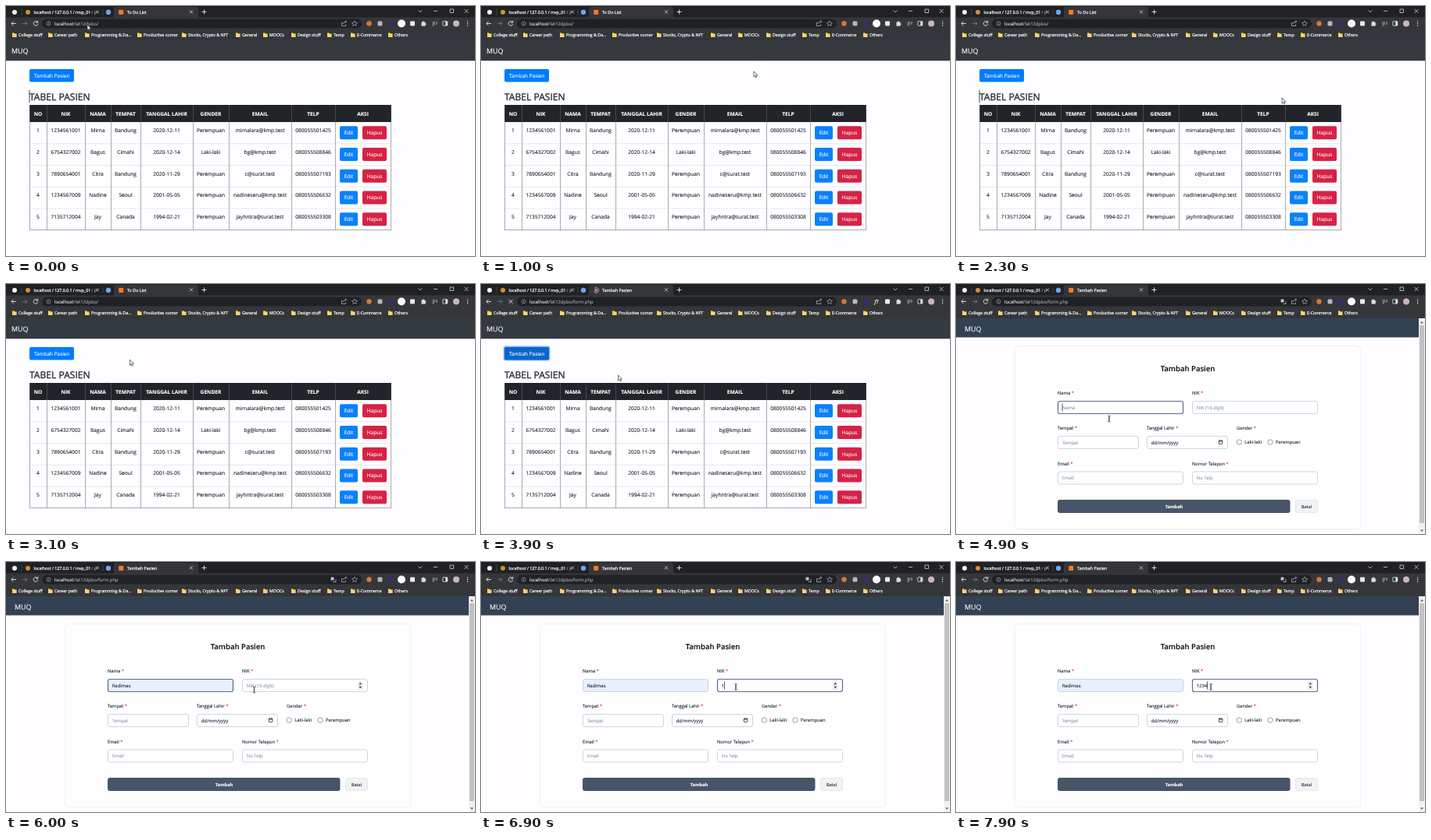
An HTML page for the animation above (8000 ms loop, 600x321 px).

```html
<!DOCTYPE html>
<html lang="id">
<head>
<meta charset="utf-8">
<title>Tambah Pasien</title>
<style>
html, body { margin: 0; width: 100%; height: 100%; overflow: hidden; background: #fff; }
svg { display: block; width: 600px; height: 321px; }
text { font-family: "Open Sans", "Noto Sans", sans-serif; text-rendering: geometricPrecision; white-space: pre; stroke-width: .12px; }
.medium { stroke-width: .28px; }
</style>
</head>
<body>
<svg id="stage" viewBox="0 0 600 321"></svg>
<script>
const LOOP = 8000, CLICK = 3500, LOAD = 3600, FORM = 4000, FOCUS = 4600, FILL = 5450, NIK = 6300;
const NAME = 'Radimas', DIGITS = '1234';

// Markup helpers
const rect = (x, y, w, h, fill, r = 0, more = '') =>
  `<rect x="${x}" y="${y}" width="${w}" height="${h}" fill="${fill}" rx="${r}" ${more}/>`;
const box = (x, y, w, h, fill, r, stroke, more = '') =>
  rect(x + .5, y + .5, w - 1, h - 1, fill, r, `stroke="${stroke}" stroke-width="1" ${more}`);
const circle = (x, y, r, fill, more = '') => `<circle cx="${x}" cy="${y}" r="${r}" fill="${fill}" ${more}/>`;
const ink = c => `fill="${c}" stroke="${c}"`;
const text = (x, y, size, color, s, more = '') => `<text x="${x}" y="${y}" font-size="${size}" ${ink(color)} ${more}>${s}</text>`;
const span = (color, s) => `<tspan ${ink(color)}>${s}</tspan>`;
const line = (d, stroke, w = 1, more = '') =>
  `<path d="${d}" fill="none" stroke="${stroke}" stroke-width="${w}" ${more}/>`;
const group = (id, body) => `<g id="${id}">${body}</g>`;
const MID = ' text-anchor="middle"', BOLD = ' font-weight="700"', MEDIUM = ' class="medium"';

function browser() {
  const pale = '#e8eaed', dim = '#a4a9af';
  const folders = [[8, 'College stuff'], [54, 'Career path'], [101, 'Programming &amp; Da...'], [168, 'Productive corner'],
    [225, 'Stocks, Crypto &amp; NFT'], [294, 'General'], [329, 'MOOCs'], [365, 'Design stuff'],
    [411, 'Temp'], [441, 'E-Commerce'], [489, 'Others']];
  return rect(0, 0, 600, 15, '#202124') + rect(0, 14.5, 600, 29.5, '#35363a') +
    `<path d="M136 15q2 0 2-2V4q0-3 3-3h102q3 0 3 3v9q0 2 2 2z" fill="#35363a"/>` +
    circle(11, 8, 3, '#f1f3f4') + line('M20 4v8M124 4v8', '#55585c', .6) +
    circle(28, 8, 3, '#d98b35') +
    text(35.6, 10, 5.25, pale, 'localhost / 127.0.0.1 / mvp_01' + span('#85888c', ' / p'), MEDIUM) +
    line('M115 5.5l4 4m0-4l-4 4M235 5.5l4 4m0-4l-4 4', '#dadce0', .8) +
    circle(131, 8, 3.2, '#6ba5ee') +
    line('M250.5 7.5h6m-3-3v6', pale, .9) +
    line('M527.5 5.5l2.5 2.5l2.5-2.5M547 6.5h5M568 4h4.5v4.5h-4.5zM586.5 4l5 5m0-5l-5 5', pale, .7) +
    group('todo', rect(144.2, 5, 6, 6, '#fb7a24', 1) + text(155, 10, 5.4, pale, 'To Do List', MEDIUM)) +
    group('tambah', text(155, 10, 5.4, pale, 'Tambah Pasien', MEDIUM)) +
    group('favicon', rect(144.2, 5, 6, 6, '#fb7a24', 1)) +
    group('loading', circle(147.2, 8, 2, '#c98a68') + line('M147.2 4.6a3.4 3.4 0 1 1-3.4 3.4', '#a9b8d4', .8, 'id="spin"')) +
    line('M13 22.5h-6m2.6-2.7l-2.7 2.7l2.7 2.7', pale, .9) +
    line('M21 22.5h6m-2.6-2.7l2.7 2.7l-2.7 2.7', '#77797d', .9) +
    group('reload', line('M40.2 20.7a2.8 2.8 0 1 0 .5 2.5M40.7 19v2.4h-2.4', pale, .9)) +
    group('stop', line('M35.8 20.2l4.6 4.6m0-4.6l-4.6 4.6', pale, .9)) +
    rect(46, 16.8, 409, 11.6, '#202124', 5.8) +
    circle(54.5, 22.5, 2.5, 'none', `stroke="${dim}" stroke-width=".7"`) + line('M54.5 22v1.8M54.5 20.9v.6', dim, .7) +
    text(62, 24.9, 5.8, pale, 'localhost' + span(dim, '/lat12dpbo/<tspan id="file">form.php</tspan>')) +
    group('translate', rect(415.5, 19.5, 4, 4, '#bdc1c6', .5) + line('M418.5 25.5h3.5v-3.5', '#bdc1c6', .8)) +
    line('M431 21.5h-1.5v4h5v-2M431.5 23q.5-3 4-3m-1.5-1.5l1.7 1.5l-1.7 1.5', '#bdc1c6', .7) +
    line('M446 19l1 2.3l2.5.2l-1.9 1.6l.6 2.4l-2.2-1.3l-2.2 1.3l.6-2.4l-1.9-1.6l2.5-.2z', '#bdc1c6', .6) +
    circle(464.5, 22.5, 3.2, '#d9772f') + rect(475.5, 19.5, 6, 6, '#b4b8be', 1.5) + rect(489.5, 19.5, 5.5, 6, '#3c2a78', 1) +
    group('disc', circle(506, 22.5, 5, '#fff')) +
    group('query', text(506, 25, 6.5, '#e8eaed', '<tspan font-style="italic">f</tspan>?', MID + MEDIUM)) +
    rect(517, 19.5, 6, 6, '#e8eaed', 1) +
    `<path d="M531.5 20.5h1.4a1 1 0 1 1 2 0h1.6v1.7a1 1 0 1 1 0 2v1.6h-5z" fill="#dadce0"/>` +
    line('M545.5 21h3.5M545.5 23h3.5M545.5 25h2M551 20v4', pale, .7) +
    rect(558.8, 19.7, 6, 5.5, 'none', .6, `stroke="${pale}" stroke-width=".8"`) + rect(562.3, 20, 2.4, 5, pale) +
    circle(576, 22.5, 4, '#c8b9b5') + [20, 22.5, 25].map(y => circle(590.5, y, .7, pale)).join('') +
    folders.map(([x, s]) => `<path d="M${x} 34.6h2.2l.8 .9h2.6v4.5h-5.6z" fill="#f8d56b"/>` +
      text(x + 8, 39, 5.3, pale, s, MEDIUM)).join('');
}

function tablePage() {
  const cols = [30, 52, 101, 134, 172, 239, 285, 365, 421, 492];
  const heads = ['NO', 'NIK', 'NAMA', 'TEMPAT', 'TANGGAL LAHIR', 'GENDER', 'EMAIL', 'TELP', 'AKSI'];
  const rows = [
    ['1234561001', 'Mirna', 'Bandung', '2020-12-11', 'Perempuan', 'mirnalara@kmp.test', '080055501425'],
    ['6754327002', 'Bagus', 'Cimahi', '2020-12-14', 'Laki-laki', 'bg@kmp.test', '080055508846'],
    ['7890654001', 'Citra', 'Bandung', '2020-11-29', 'Perempuan', 'c@surat.test', '080055507193'],
    ['1234567009', 'Nadine', 'Seoul', '2001-05-05', 'Perempuan', 'nadineseru@kmp.test', '080055506632'],
    ['7135712004', 'Jay', 'Canada', '1994-02-21', 'Perempuan', 'jayhntra@surat.test', '080055503308']];
  const center = i => (cols[i] + cols[i + 1]) / 2;
  const columns = (y, h) => cols.map(x => `M${x + .5} ${y}v${h}`).join('');
  let s = rect(0, 44, 600, 277, '#fefdff') + rect(0, 44, 600, 26.3, '#343a40') + text(7, 61, 8.9, '#fff', 'MUQ') +
    rect(28.6, 79.6, 59.8, 18.8, '#80bdff', 3, 'id="ring"') + rect(30, 81, 57, 16.5, '#007bff', 2, 'id="add"') +
    text(58.7, 91.8, 6.45, '#fff', 'Tambah Pasien', MID) +
    text(30, 121, 12.1, '#212529', 'TABEL PASIEN', MEDIUM) + rect(29.6, 108, .8, 16, '#111', 0, 'id="pageCaret"') +
    rect(30, 127, 463, 22, '#212529');
  heads.forEach((h, i) => s += text(center(i), 140.6, 6.6, '#fff', h, MID + BOLD));
  rows.forEach((row, n) => {
    const y = 149 + n * 27.75;
    [n + 1, ...row].forEach((c, i) => s += text(center(i), y + 13.2, 6.65, '#212529', c, MID));
    s += rect(427, y + 5.2, 23, 17, '#0b80fb', 2) + text(438.5, y + 16.1, 6.5, '#fff', 'Edit', MID) +
      rect(456, y + 5.2, 31, 17, '#d62246', 2) + text(471.5, y + 16.1, 6.5, '#fff', 'Hapus', MID);
    if (n) s += line(`M30 ${y}H492`, '#e2e4ea', .8);
  });
  return s + line(columns(127, 22), '#4a5158', .8) + line(columns(149, 139) + 'M30 287.5H493', '#94979b', .8);
}

function formPage() {
  const dark = '#1e293b', star = span('#ef4444', '*');
  const field = (x, y, w, label, hint, id = '') =>
    text(x, y - 8, 5.8, dark, `${label} ${star}`) +
    box(x, y, w, 17, '#fff', 2.5, '#cbd5e1', id && `id="${id}Box"`) +
    text(x + 5.7, y + 10.7, 5.95, '#8f9bad', hint, id && `id="${id}Text"`);
  const radio = (x, s) => circle(x, 203, 3.2, '#fff', 'stroke="#767676" stroke-width=".7"') + text(x + 7, 205.1, 5.8, dark, s);
  return rect(0, 44, 600, 277, '#fefdff') + rect(0, 44, 592, 24.5, '#334155') + text(11, 60.5, 8.9, '#fff', 'MUQ') +
    rect(592, 44, 8, 277, '#f1f1f1') + rect(593, 53, 6, 254, '#c1c1c1') +
    '<path d="M594 50.5h4l-2-2.5zM594 315.5h4l-2 2.5z" fill="#606060"/>' +
    box(75, 79, 443, 236, '#fefeff', 5, '#f0f1f6') +
    text(296.5, 111.6, 9.55, '#0b0f19', 'Tambah Pasien', MID + ' font-weight="600"') +
    field(130, 150, 161, 'Nama', 'Nama', 'name') + field(302, 150, 161, 'NIK', 'NIK (16 digit)', 'nik') +
    group('spinner', rect(450, 153, 6.5, 11, '#ececec', 1) + '<path d="M451.5 157.3h3.6l-1.8-2.5zM451.5 159.7h3.6l-1.8 2.5z" fill="#444"/>') +
    field(130, 195, 104, 'Tempat', 'Tempat') + field(244, 195, 104, 'Tanggal Lahir', span(dark, 'dd/mm/yyyy')) +
    rect(336.3, 201.2, 4.6, 4.2, 'none', .4, 'stroke="#111" stroke-width=".7"') + line('M336 202h5M337.4 200v1M339.8 200v1', '#111', .7) +
    text(359, 187, 5.8, dark, 'Gender ' + star) +
    radio(362.3, 'Laki-laki') + radio(402, 'Perempuan') +
    field(130, 240.5, 161, 'Email', 'Email') + field(302, 240.5, 161, 'Nomor Telepon', 'No Telp') +
    rect(130, 277, 297.5, 17, '#475569', 3) + text(279, 287.7, 5.7, '#fff', 'Tambah', MID + BOLD) +
    box(434, 277, 29, 17, '#f1f2f3', 2.5, '#e6e8eb') + text(448.5, 287.7, 5.6, dark, 'Batal', MID) +
    rect(0, 153.5, .7, 10, '#111', 0, 'id="formCaret"');
}

const outline = 'stroke="#111" stroke-width=".6" stroke-linejoin="round"';
stage.innerHTML = group('tableView', tablePage()) + group('formView', formPage()) + browser() +
  group('mouse',
    `<path id="arrow" d="M0 0v7l1.6-1.5l1.1 2.5l1.1-.5l-1.1-2.5h2.2z" fill="#fff" ${outline}/>` +
    `<path id="hand" d="M0 0q1-.8 1.3.4v3l3.2.7q.9.3.8 1.2l-.5 3.3h-4l-2.5-3.2q.3-1 1.7 0z" fill="#fff" ${outline}/>` +
    line('M-1.6-4q1.6 0 1.6.8v6.4q0 .8-1.6.8M1.6-4q-1.6 0-1.6.8v6.4q0 .8 1.6.8', '#222', .7, 'id="beam"'));

const $ = id => document.getElementById(id);
const show = (id, on) => $(id).style.display = on ? '' : 'none';
const set = (id, attrs) => { for (const k in attrs) $(id).setAttribute(k, attrs[k]); };
const blink = ms => Math.floor(ms / 530) % 2 === 0;

// time, x, y
const path = [[0, 104, 24], [250, 135, 42], [700, 330, 80], [1000, 349, 84], [1500, 372, 95], [2300, 417, 118],
  [2700, 400, 118], [3300, 75, 90], [3600, 72, 90], [3900, 175.5, 117], [4400, 202, 157], [4600, 198, 159],
  [4900, 196, 173], [5550, 197, 173], [6000, 317.5, 164], [6300, 320, 159], [6800, 326, 160.5], [8000, 326, 160.5]];

function pointer(t) {
  const i = path.findIndex(p => p[0] > t), [a, x, y] = path[i - 1], [b, u, v] = path[i];
  const k = (t - a) / (b - a), e = k * k * (3 - 2 * k);
  return [x + (u - x) * e, y + (v - y) * e];
}

function entry(id, value, hint, active, filled) {
  const color = value ? '#1e293b' : '#8f9bad';
  $(id + 'Text').textContent = value || hint;
  set(id + 'Text', { fill: color, stroke: color });
  set(id + 'Box', { fill: filled ? '#e8f0fe' : '#fff', stroke: active ? '#5b6d8b' : '#cbd5e1', 'stroke-width': active ? 1.2 : 1 });
}

function draw() {
  const t = performance.now() % LOOP;
  const loading = t >= LOAD && t < FORM, form = t >= FORM;
  const [x, y] = pointer(t);

  show('tableView', !form);
  show('formView', form);
  show('todo', t < LOAD);
  show('tambah', t >= LOAD);
  show('favicon', form);
  for (const id of ['loading', 'stop', 'query']) show(id, loading);
  for (const id of ['reload', 'disc']) show(id, !loading);
  show('file', t >= LOAD);
  show('translate', form);
  set('spin', { transform: `rotate(${t * .36} 147.2 8)` });

  const onButton = !form && x > 30 && x < 87 && y > 81 && y < 97;
  show('pageCaret', t < CLICK && blink(t));
  show('ring', t >= CLICK);
  set('add', { fill: t >= CLICK || onButton ? '#0a66c8' : '#007bff' });

  const typed = Math.max(0, Math.floor((t - 4850) / 150));
  const name = t >= FILL ? NAME : NAME.slice(0, typed);
  const count = Math.min(4, Math.max(0, Math.floor((t - 6500) / 300)));
  const inName = t >= FOCUS && t < NIK, inNik = t >= NIK;
  const overNik = x > 302 && x < 463 && y > 150 && y < 167;
  entry('name', name, 'Nama', inName, t >= FILL);
  entry('nik', DIGITS.slice(0, count), 'NIK (16 digit)', inNik, false);
  show('spinner', inNik || overNik);

  const id = inNik ? 'nikText' : 'nameText';
  const value = inNik ? count : name.length;
  const since = inNik ? (count ? 6500 + count * 300 : NIK) : t >= FILL ? FILL : typed ? 4850 + typed * 150 : FOCUS;
  show('formCaret', t >= FOCUS && blink(t - since));
  if (form) set('formCaret', { x: +$(id).getAttribute('x') + (value ? $(id).getComputedTextLength() : 0) });

  const beam = form && y > 140;
  set('mouse', { transform: `translate(${x} ${y})` });
  show('beam', beam);
  show('hand', onButton);
  show('arrow', !beam && !onButton);
  requestAnimationFrame(draw);
}
draw();
</script>
</body>
</html>
```
